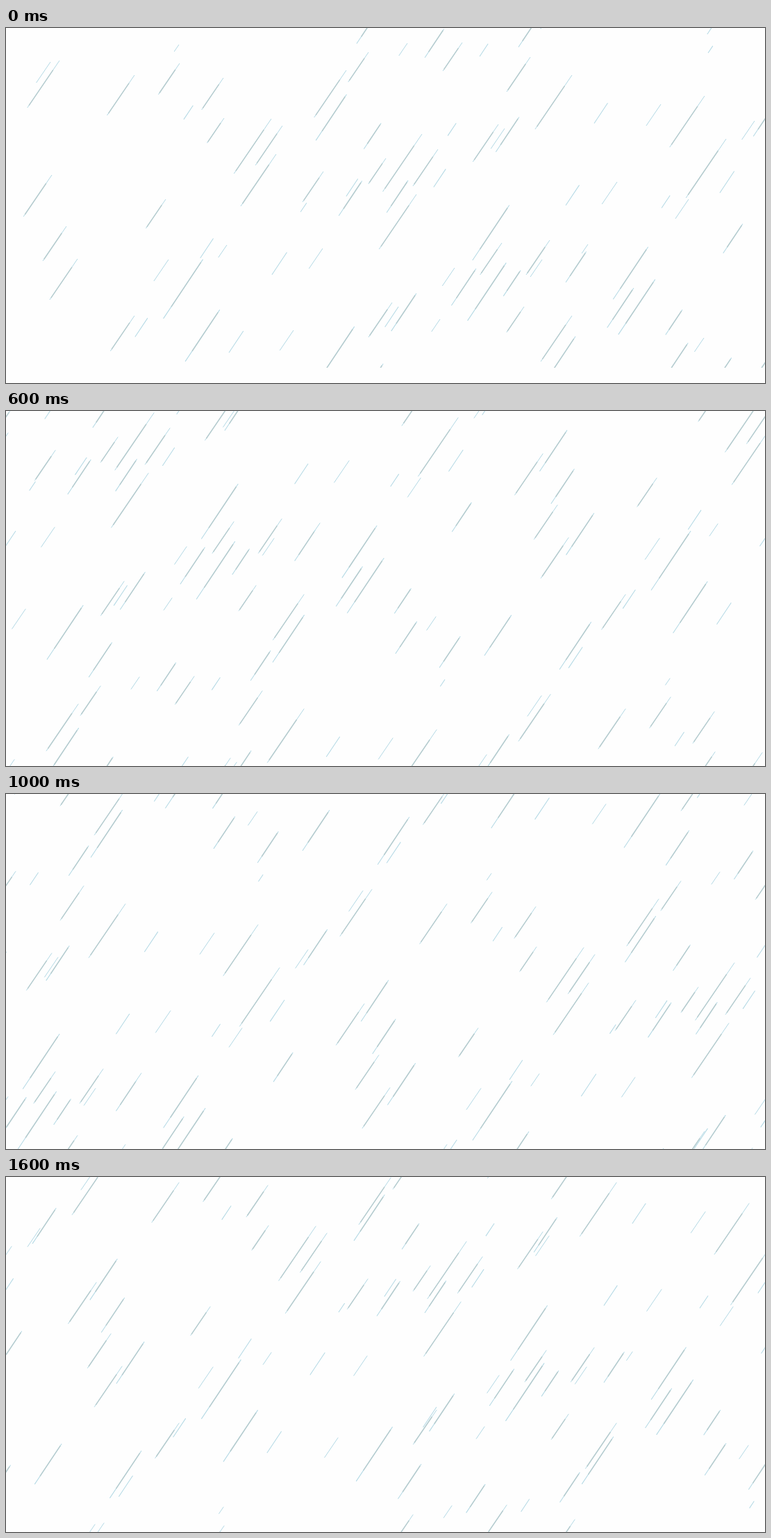
Recreate the animation shown at these times as an HTML page with a canvas. Size 1093 px wide and 512 px high, loop 1.7 s.

```html
<!DOCTYPE html>
<html lang="en">
<head>
<meta charset="utf-8">
<title>Rain</title>
<style>
  html, body { margin: 0; height: 100%; overflow: hidden; background: #fefefe; }
  canvas { display: block; }
</style>
</head>
<body>
<canvas id="stage" width="1093" height="512"></canvas>
<script>
const W = 1093, H = 512, STEPS = 17, STEP_MS = 100;
const SLANT = 0.68;
const ctx = document.getElementById('stage').getContext('2d');

// One tile of rain: x and y of the upper end, height
const drops = [
  [249, 24, 10], [64, 49, 30], [77, 47, 68], [185, 68, 58], [250, 51, 45], [313, 72, 46],
  [314, 130, 36], [382, 131, 79], [398, 141, 57], [389, 182, 75], [522, 35, 43], [490, 61, 68],
  [578, 22, 18], [657, 21, 41], [755, 42, 50], [815, 68, 78], [943, 110, 31], [1006, 98, 74],
  [1078, 134, 27], [709, 139, 54], [718, 145, 29], [599, 153, 83], [622, 175, 53], [547, 188, 37],
  [591, 240, 79], [457, 207, 44], [66, 212, 60], [230, 247, 42], [87, 286, 50], [103, 333, 59],
  [318, 313, 18], [234, 334, 31], [456, 318, 29], [714, 310, 46], [646, 346, 26], [783, 306, 50],
  [772, 334, 25], [838, 312, 13], [1037, 160, 85], [880, 222, 32], [983, 247, 28], [1005, 447, 20],
  [815, 415, 66], [746, 402, 37], [625, 420, 18], [556, 396, 50], [414, 436, 29], [185, 415, 51]
];

// The tile repeated; each drop covers the part of its height from a to b
function sheet(a, b, minHeight) {
  const path = new Path2D();
  for (let i = -1; i <= 1; i++)
    for (let j = -2; j <= 3; j++)
      for (const [x, y, h] of drops) {
        if (h < minHeight) continue;
        for (const [part, join] of [[a, 'moveTo'], [b, 'lineTo']])
          path[join](x + i * W - SLANT * h * part, y + j * H + h * part);
      }
  return path;
}

const streaks = sheet(0, 1, 0);
const cores = sheet(0.2, 0.95, 35);

function drawSheet() {
  ctx.strokeStyle = '#b2d8e4';
  ctx.lineWidth = 1;
  ctx.stroke(streaks);
  ctx.strokeStyle = '#b6cccf';
  ctx.lineWidth = 1.5;
  ctx.stroke(cores);
}

function draw(step) {
  ctx.clearRect(0, 0, W, H);
  ctx.save();
  ctx.translate(-W * step / STEPS, 2 * H * step / STEPS);
  drawSheet();
  // Second sheet: the same rain turned by almost half a circle, ending at its left and lower edge
  ctx.beginPath();
  ctx.rect(172, -3 * H, 3 * W, 3 * H + 490);
  ctx.clip();
  ctx.translate(1265, 569.6);
  ctx.rotate(Math.PI - 0.0092);
  drawSheet();
  ctx.restore();
}

let shown = -1;
function tick() {
  const step = Math.floor(performance.now() / STEP_MS) % STEPS;
  if (step !== shown) draw(shown = step);
  requestAnimationFrame(tick);
}
tick();
</script>
</body>
</html>
```
